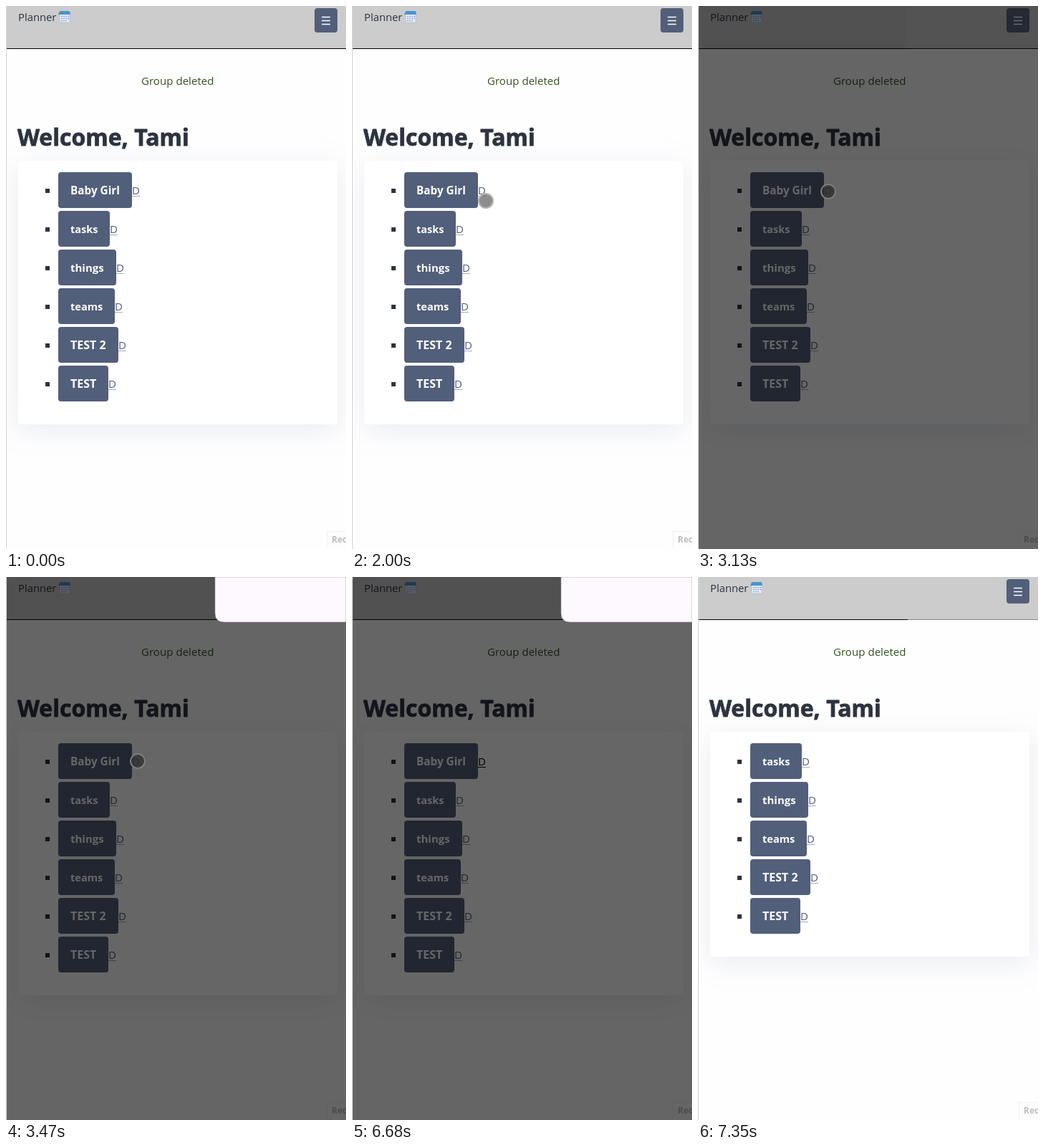
Recreate the animation shown at these times as an HTML page. Size 475 by 758 pixels, loop 8000 ms.

```html
<!DOCTYPE html>
<html lang="en">
<head>
<meta charset="utf-8">
<title>Planner</title>
<style>
  html, body { margin: 0; width: 100%; height: 100%; overflow: hidden; background: #fefefe; }
  svg { display: block; width: 475px; height: 758px; font: 15px "Open Sans", "Noto Sans", sans-serif; }
  .ink { fill: #2d333f; }
  .btn { fill: #525f7a; }
  .label { fill: #fff; font-weight: 700; }
  .link { fill: #525f7a; }
  .rule { fill: #a3aaba; }
  .hot .link, .hot .rule { fill: #000; }
  .title { font-size: 32px; font-weight: 700; stroke: #2d333f; stroke-width: .8px; }
  #card { fill: #fff; filter: drop-shadow(0 8px 20px rgba(85, 95, 150, .12)); }
</style>
</head>
<body>
<svg viewBox="0 0 475 758">
  <rect width="475" height="758" fill="#fefefe"/>
  <rect id="card" x="17" y="216" width="446" height="368" rx="4"/>

  <rect width="475" height="59" fill="#ccc"/>
  <rect y="59" width="475" height="1" fill="#000"/>
  <rect id="fadedLine" x="293" y="59" width="182" height="1" fill="#858585"/>
  <text class="ink" x="17" y="21" font-size="14.8">Planner</text>
  <g id="calendar">
    <path d="M76 9H89V22Q89 23 88 23H76Q75 23 75 22V10Z" fill="#e9effb" stroke="#a9b8d6" stroke-width=".8"/>
    <path d="M73 12L75 7H88Q89.500 7 89.500 9V12Z" fill="#4a94d0"/>
    <path d="M77 14.500H88M77 17.500H88M77 20.500H86" stroke="#8ea5dc" stroke-width="1.700" stroke-dasharray="2 1"/>
  </g>
  <rect class="btn" x="431" y="3" width="32" height="34" rx="4"/>
  <path d="M441 15.500H453M441 20.500H453M441 25.500H453" stroke="#fff" stroke-width="1.300"/>

  <text x="189" y="110" font-size="15.100" fill="#33511f">Group deleted</text>
  <text class="ink title" x="16" y="195">Welcome, Tami</text>
  <g id="before"></g>
  <g id="after"></g>

  <rect x="448.500" y="733.500" width="40" height="40" fill="#fdfdfd" stroke="#f1f1f1"/>
  <text x="455" y="749" font-size="12" font-weight="700" fill="#bdbdbd">Rec</text>

  <rect id="dim" x="1" width="474" height="758" opacity=".6"/>
  <path id="dialog" d="M292 0V50Q292 63 305 63H475V0Z" fill="#fef9ff" stroke="#8a888b" stroke-width=".6"/>
  <rect width="1" height="758" fill="#d2d2d2"/>
  <g id="cursor">
    <circle id="halo" r="12" fill="#d8cf2e" opacity=".8"/>
    <circle id="dot" r="10" stroke-width="2"/>
  </g>
</svg>
<script>
const LOOP = 8000;
const $ = id => document.getElementById(id);

// label, button width, text size
const groups = [
  ["Baby Girl", 103, 15.3], ["tasks", 72, 14.5], ["things", 81, 15],
  ["teams", 79, 14.6], ["TEST 2", 84, 16], ["TEST", 70, 16]
];

function row([label, width, size], i) {
  const y = 232 + i * 54, end = 73 + width;
  return `<g>
    <rect class="ink" x="55" y="${y + 23}" width="6" height="6"/>
    <rect class="btn" x="73" y="${y}" width="${width}" height="50" rx="4"/>
    <text class="label" x="90" y="${y + 31}" font-size="${size}">${label}</text>
    <text class="link" x="${end}" y="${y + 31}">D</text>
    <rect class="rule" x="${end}" y="${y + 33}" width="11" height="1"/>
  </g>`;
}
$("before").innerHTML = groups.map(row).join("");
$("after").innerHTML = groups.slice(1).map(row).join("");
const firstRow = $("before").firstElementChild;

// Cursor legs: first step, last step, step count, start, bend, end, leaves the stage
const legs = [
  [130, 730, 10, [430, 762], [-40, 40], [486, 150], true],
  [1250, 2000, 11, [465, 188], [300, 240], [187, 272]],
  [2070, 2460, 6, [188, 270], [182, 270], [178, 262]],
  [2600, 2720, 3, [179, 261], [180, 260], [182, 259]],
  [3470, 4080, 10, [184, 257], [310, 200], [462, 168], true]
];

function cursorAt(t) {
  const leg = legs.filter(l => t >= l[0]).pop();
  if (!leg) return null;
  const [from, to, count, a, b, c, leaves] = leg;
  const step = Math.min(count - 1, Math.floor((t - from) / (to - from) * (count - 1) + 1e-6));
  if (leaves && step === count - 1) return null;
  const s = step / (count - 1), k = s * s * (3 - 2 * s);
  return a.map((v, i) => (1 - k) ** 2 * v + 2 * k * (1 - k) * b[i] + k * k * c[i]);
}

// Value of the last step reached in a [time, value] table
const held = (table, t) => table.filter(s => t >= s[0]).pop()[1];
const dialogFade = [[0, 0], [3130, .01], [3200, .4], [3270, .8], [3330, 1], [6750, .5], [6810, .15], [6880, 0]];

function show(el, on) { el.style.display = on ? "" : "none"; }

function draw(t) {
  const dimmed = t >= 3130 && t < 6750;
  const pressed = t >= 3010 && t < 3130;
  const deleted = t >= 7350;

  show($("dim"), dimmed);
  $("dialog").style.opacity = held(dialogFade, t);
  show($("fadedLine"), t >= 6750);
  show($("before"), !deleted);
  show($("after"), deleted);
  $("card").setAttribute("height", deleted ? 314 : 368);
  firstRow.classList.toggle("hot", t >= 6680 && t < 6880);

  const at = cursorAt(t);
  show($("cursor"), at);
  if (!at) return;
  $("cursor").setAttribute("transform", `translate(${at})`);
  show($("halo"), pressed);
  const [fill, ring] = pressed ? ["rgba(140,135,20,.45)", "none"]
    : dimmed ? ["rgba(48,48,48,.78)", "#7c7c7c"]
    : ["rgba(112,112,112,.8)", "#b4b4b4"];
  $("dot").setAttribute("fill", fill);
  $("dot").setAttribute("stroke", ring);
}

const start = performance.now();
function tick() {
  draw((performance.now() - start) % LOOP);
  requestAnimationFrame(tick);
}
tick();
</script>
</body>
</html>
```
